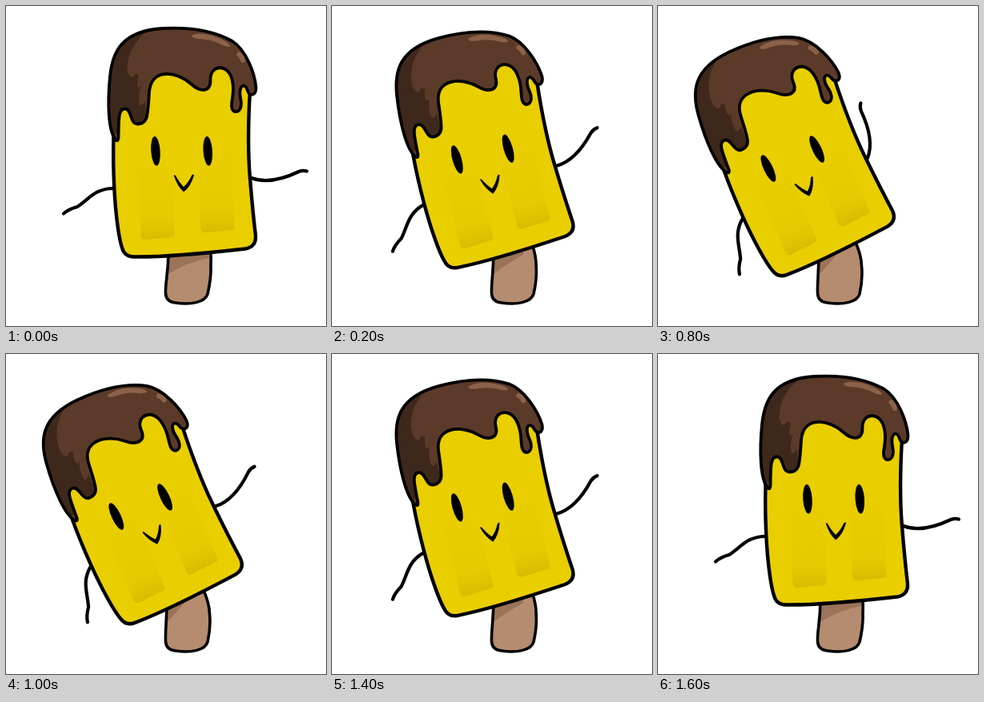
Write an HTML page that moves like this. It is 400x400 px and loops after 1.9 s.

```html
<!DOCTYPE html>
<html lang="en">
<head>
<meta charset="utf-8">
<title>Waving ice pop</title>
<style>
html, body { margin: 0; width: 100%; height: 100%; overflow: hidden; background: #fff; }
svg { display: block; width: 100vw; height: 100vh; }
.line { fill: none; stroke: #000; stroke-width: 4.2; stroke-linecap: round; stroke-linejoin: round; }
</style>
</head>
<body>
<svg viewBox="0 0 400 400">
  <defs>
    <path id="stick"/>
    <path id="choc" d="M138 168C127 158 127 118 130 88C133 58 144 31 196 28C233 26 262 32 283 44
      C300 55 311 84 312.5 102C312.5 113 304 113 302 106S295 97 293 104S294 116 294 122
      C294 135 282 135 282 125S286 108 283 94C279 71 255 73 255.5 92C256 109 242 107 232 98
      C213 81 181 77 179 108S177 147 165 147.5C154 148 158 129 149 128.5S141 142 140.5 165Q140 169 138 168Z"/>
    <path id="panel" fill="url(#fade)" d="M163 178L207 176Q209 240 211 285Q211 289 207 289L174 292Q169 292 168.5 287Q167 230 163 178Z"/>
    <ellipse id="eye" cx="187" cy="181.3" rx="5.7" ry="18.3" transform="rotate(-4 187 181.3)"/>
    <clipPath id="inStick"><use href="#stick"/></clipPath>
    <clipPath id="inChoc"><use href="#choc"/></clipPath>
    <linearGradient id="fade" x2="0" y2="1">
      <stop offset="0" stop-color="#dcc000" stop-opacity="0"/>
      <stop offset=".75" stop-color="#dcc000" stop-opacity=".25"/>
      <stop offset="1" stop-color="#d2b600" stop-opacity=".8"/>
    </linearGradient>
  </defs>

  <use href="#stick" fill="#b58c70"/>
  <path id="shade" fill="#9a7359" clip-path="url(#inStick)"/>
  <use href="#stick" class="line" style="stroke-width:3.6"/>

  <g id="body">
    <path id="armL" class="line" d="M134 228C112 228 104 241 89 251Q78 254 72 259.5"/>
    <path id="armR" class="line" d="M307 215C325 222 345 217 366 207Q371 205 376 206.5"/>
    <path class="line" style="fill:#e9ce00;stroke-width:4.4" d="M135 150C133 190 135 235 138 262
      C140 280 142 293 145 302Q148 313.5 160 313.5C190 314 250 309 299 303.5Q313 301 312 287
      C309 262 307 240 305 215C302 180 303 140 305 106L270 60L160 60Z"/>
    <use href="#panel"/>
    <use href="#panel" x="74.5" y="-9"/>
    <use href="#choc" fill="#5c3a2a"/>
    <g clip-path="url(#inChoc)">
      <path fill="#3e281b" d="M174 34C158 46 150 66 152 82Q155 91 159 88Q163 82 166 87Q163 97 165 101
        Q168 103 170 98Q164 112 167 124Q171 125 174 119L176 160H120V30Z"/>
      <path fill="#8b6249" d="M233 36Q249 32 268 41Q281 47 280 50.5Q276 52 267 47Q255 41 239 41Q230 39 233 36Z"/>
      <path fill="none" stroke="#8b6249" stroke-width="6" stroke-linecap="round" d="M291.5 60.5Q295 63 296 68"/>
    </g>
    <use href="#choc" class="line" style="stroke-width:3.8"/>
    <use href="#eye"/>
    <use href="#eye" x="65.3"/>
    <path d="M210 212.5Q214 225 222 232.5Q231 226 235 211.5Q234 209.5 232 212Q228 221 222 226Q217 221 212 212Q210 210.5 210 212.5Z"/>
  </g>
</svg>
<script>
const LOOP = 1900, STEP = 100, MIDDLE = 8, LEAN_STEPS = 3, MAX_LEAN = 21.5;
const set = (id, name, value) => document.getElementById(id).setAttribute(name, value);
const turn = (id, angle, x, y) => set(id, 'transform', `rotate(${angle} ${x} ${y})`);

// The stick's foot stays put while its top bends with the lean k (0 to 1)
function drawStick(k) {
  const right = 256 - 10 * k;
  set('stick', 'd', `M${203 - 2 * k} 306C${203 - 2 * k} 335 199 345 199.5 359Q200 370 212 371` +
    `C232 374 249 370 252 360C255 347 ${256.5 - k} 335 ${256 - 1.5 * k} 325` +
    `Q${256.5 - 2 * k} ${316 - 4 * k} ${right} ${305 - 12 * k}`);
  set('shade', 'd', `M190 ${342 - k}L203 ${335 - k}Q${224 - 12 * k} ${321 + 3 * k} ` +
    `${257 - 32 * k} ${314 - 5 * k}V285H190Z`);
}

// Lean in, wave in a cycle of three, then play it all backwards
function render(ms) {
  const step = Math.floor(ms % LOOP / STEP);
  const n = Math.max(0, MIDDLE - Math.abs(MIDDLE - step));
  const k = Math.min(1, n / LEAN_STEPS) ** 1.43;
  const sway = 2.2 * Math.sin(Math.PI * k);
  const wave = n < LEAN_STEPS ? 43 * k : 17 + 51.5 * (n % 3 / 2) ** 0.8;

  set('body', 'transform', `translate(${-sway} ${sway / 3}) rotate(${-MAX_LEAN * k} 219.5 321.5)`);
  turn('armL', -38.5 * k ** 1.35, 134, 228);
  turn('armR', -wave, 307, 215);
  drawStick(k);
}

const begin = performance.now();
function tick() {
  render(performance.now() - begin);
  requestAnimationFrame(tick);
}
tick();
</script>
</body>
</html>
```
